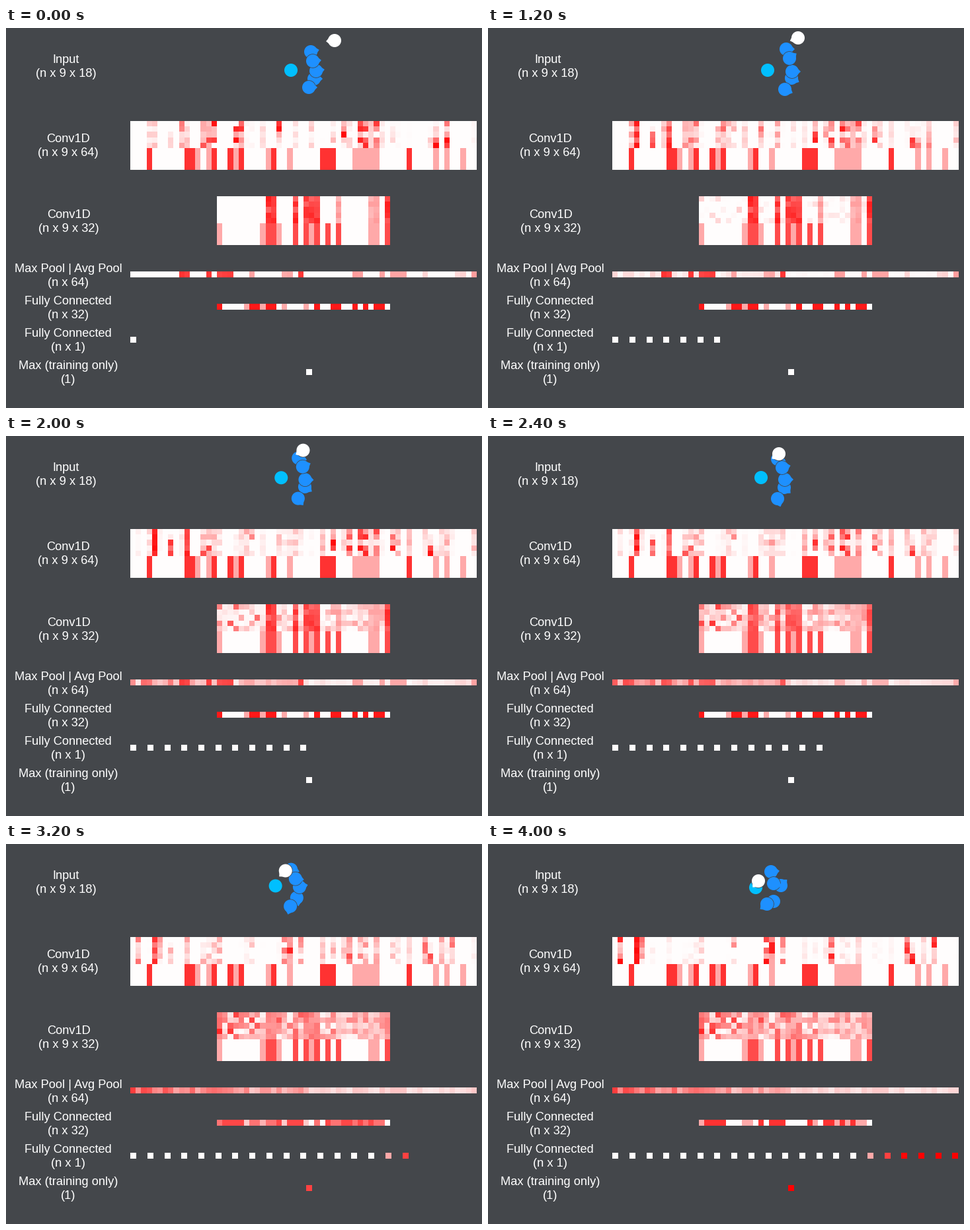
A matplotlib script that plays this animation: 720x576 px, repeating every 4.2 s.

```python
import matplotlib.pyplot as plt
import numpy as np
from matplotlib.animation import FuncAnimation
from matplotlib.colors import LinearSegmentedColormap
from matplotlib.patches import Circle, Polygon, Rectangle

W, H, FRAMES = 720, 576, 21
BG, BLUE, CYAN = "#44474b", "#1e90ff", "#00bfff"
HEAT = LinearSegmentedColormap.from_list("heat", ["#fffdfd", "#ff0000"])
CELL = 524 / 64
SLOTS, IDLE_SLOTS = 5, 4
rng = np.random.RandomState(7)

# Agents pass smoothly through four poses: colour, x, y, heading in degrees.
POSE_TIMES = [0, 6, 12, 20]
AGENTS = [
    (CYAN, [431, 423, 413, 405], [64, 64, 63, 66], None),
    (BLUE, [461, 451, 438, 428], [36, 32, 35, 42], [-13, 0, 15, -5]),
    (BLUE, [466, 459, 448, 432], [77, 76, 78, 87], [0, 27, 42, 160]),
    (BLUE, [469, 460, 449, 443], [65, 66, 66, 63], [-9, 0, 0, -44]),
    (BLUE, [464, 456, 445, 432], [50, 46, 48, 60], [-5, -35, -14, 15]),
    (BLUE, [458, 449, 438, 422], [90, 93, 95, 91], [0, 25, 70, 143]),
    ("white", [497, 469, 440, 409], [19, 15, 27, 56], [175, 160, 145, 132]),
]

LABELS = [
    (91, 53, "Input", "(n x 9 x 18)"),
    (94, 173, "Conv1D", "(n x 9 x 64)"),
    (95, 288, "Conv1D", "(n x 9 x 32)"),
    (94, 370, "Max Pool | Avg Pool", "(n x 64)"),
    (94, 419, "Fully Connected", "(n x 32)"),
    (94, 468, "Fully Connected", "(n x 1)"),
    (94, 517, "Max (training only)", "(1)"),
]


def bands(n, strong, faint=(), high=.8, low=.33):
    """A row of n filters, dark except for the named strong and faint ones."""
    values = np.zeros(n)
    values[list(faint)] = low
    values[list(strong)] = high
    return values


def bump(frame, peak, width):
    return np.exp(-((frame - peak) / width) ** 2)


def ease(frame, start, end):
    t = np.clip((frame - start) / (end - start), 0, 1)
    return t * t * (3 - 2 * t)


# Filters that answer to an empty slot never change.
IDLE_1 = bands(64, [3, 10, 11, 15, 18, 20, 26, 35, 36, 37, 51],
               [12, 14, 19, 25, 29, *range(41, 46), 56, 58, 61])
IDLE_2 = bands(32, [9, 10, 14, 16, 18, 20, 22, 31], [0, 8, 11, 17, 28, 29], .7)

# First layer: groups of filters respond early, midway and late in the run.
GROUPS = [
    (0, bands(64, [9, 13, 14, 15, 19, 20, 27, 39, 42, 43, 45, 56, 58])),
    (9, bands(64, [4, 7, 10, 13, 14, 22, 37, 40, 42, 43, 45, 48, 55])),
    (20, bands(64, [1, 4, 5, 22, 28, 29, 31, 40, 54, 55, 59])),
]
GAIN = np.clip(rng.uniform(-.1, 1.4, (SLOTS, 64)), 0, 1.2)
LAG = rng.uniform(-2, 2, (SLOTS, 64))
FAINT = rng.uniform(0, .4, (SLOTS, 64)) * (rng.rand(64) < .4)
FAINT_PEAK = rng.uniform(0, 20, 64)

# Second layer: a few clear filters at first, then activity in nearly all.
CLEAR = bands(32, [9, 10, 14, 16, 17, 18, 31], [22, 28, 29], .75)
CLEAR_GAIN = rng.uniform(.8, 1.2, (SLOTS, 32))
SPREAD = rng.uniform(0, .85, (SLOTS, 32)) * np.linspace(1, .5, 32)
ONSET = rng.uniform(2, 9, (SLOTS, 32))

DENSE_START = bands(32, [0, 6, 7, 9, 10, 18, 21, 22, 25, 27, 29, 30],
                    [5, 8, 12, 16], .9)
DENSE_END = bands(32, [1, 2, 3, 4, 11, 13, 14, 15, 20, 23, 24, 26, 28],
                  [0, 8, 9, 21, 25, 27, 29, 30])


def first_layer(frame):
    groups = [level * GAIN * bump(frame, peak + LAG, 6.5)
              for peak, level in GROUPS]
    faint = FAINT * bump(frame, FAINT_PEAK, 6)
    return np.clip(np.max(groups + [faint], axis=0), 0, 1)


def second_layer(frame):
    fade = 1 - .6 * ease(frame, 8, 20)
    spread = SPREAD * ease(frame, ONSET, ONSET + 9)
    return np.clip(np.maximum(CLEAR * CLEAR_GAIN * fade, spread), 0, 1)


def dense_layer(frame):
    # Both sets overlap while one hands over to the other.
    return np.maximum(DENSE_START * (1 - ease(frame, 13, 20)),
                      DENSE_END * ease(frame, 12, 17))


def score(frame):
    return np.sin(np.pi / 2 * np.clip((frame - 14.3) / 3.2, 0, 1))


fig = plt.figure(figsize=(W / 72, H / 72), dpi=72, facecolor=BG)
ax = fig.add_axes([0, 0, 1, 1])
ax.axis("off")


def heatmap(x, y, cols, rows):
    extent = (x, x + cols * CELL, y + rows * CELL, y)
    return ax.imshow(np.zeros((rows, cols)), cmap=HEAT, vmin=0, vmax=1,
                     extent=extent, interpolation="nearest", aspect="auto")


def square(x, y):
    return ax.add_patch(Rectangle((x, y), 9, 9, lw=0, antialiased=False))


for x, y, title, shape in LABELS:
    for dy, text in ((0, title), (21, shape)):
        ax.text(x, y + dy, text, color="white", size=18.2, ha="center",
                va="baseline", family="Liberation Sans")

conv_1 = heatmap(188, 141, 64, SLOTS + IDLE_SLOTS)
conv_2 = heatmap(319, 255, 32, SLOTS + IDLE_SLOTS)
pool = heatmap(188, 369.4, 64, 1)
dense = heatmap(319, 418.4, 32, 1)
scores = [square(round(188.1 + 25.715 * k), 468) for k in range(FRAMES)]
best = square(454, 517)


class Agent:
    def __init__(self, color, xs, ys, headings, z):
        self.paths = [np.polyfit(POSE_TIMES, p, 3) for p in (xs, ys)]
        self.turn = None
        if headings:
            self.turn = np.polyfit(POSE_TIMES, np.radians(headings), 3)
        self.rim = Circle((0, 0), 10.8, fc=BG, lw=0, zorder=z)
        self.tip = Polygon(np.zeros((3, 2)), fc=color, lw=0, zorder=z + .2)
        self.disc = Circle((0, 0), 10, fc=color, lw=0, zorder=z + .4)
        for patch in (self.rim, self.tip, self.disc):
            ax.add_patch(patch)

    def move(self, frame):
        center = np.array([np.polyval(p, frame) for p in self.paths])
        self.rim.center = self.disc.center = tuple(center)
        if self.turn is not None:
            angles = np.polyval(self.turn, frame) + np.array([-.5, 0, .5])
            reach = np.array([9.5, 13, 9.5])
            offset = np.c_[reach * np.cos(angles), reach * np.sin(angles)]
            self.tip.set_xy(center + offset)


agents = [Agent(*spec, z=5 + k) for k, spec in enumerate(AGENTS)]
ax.set(xlim=(0, W), ylim=(H, 0))


def draw(frame):
    for agent in agents:
        agent.move(frame)

    first, second = first_layer(frame), second_layer(frame)
    conv_1.set_data(np.vstack([first] + [IDLE_1] * IDLE_SLOTS))
    conv_2.set_data(np.vstack([second] + [IDLE_2] * IDLE_SLOTS))
    pool.set_data([np.r_[second.max(0) * .9, second.mean(0) * .48]])
    dense.set_data([dense_layer(frame)])

    for k, mark in enumerate(scores):
        mark.set_visible(k <= frame)
        mark.set_facecolor(HEAT(score(k)))
    best.set_facecolor(HEAT(score(frame)))
    return []


anim = FuncAnimation(fig, draw, frames=FRAMES, interval=200, repeat=True,
                     repeat_delay=0, blit=False)
plt.show()
```
